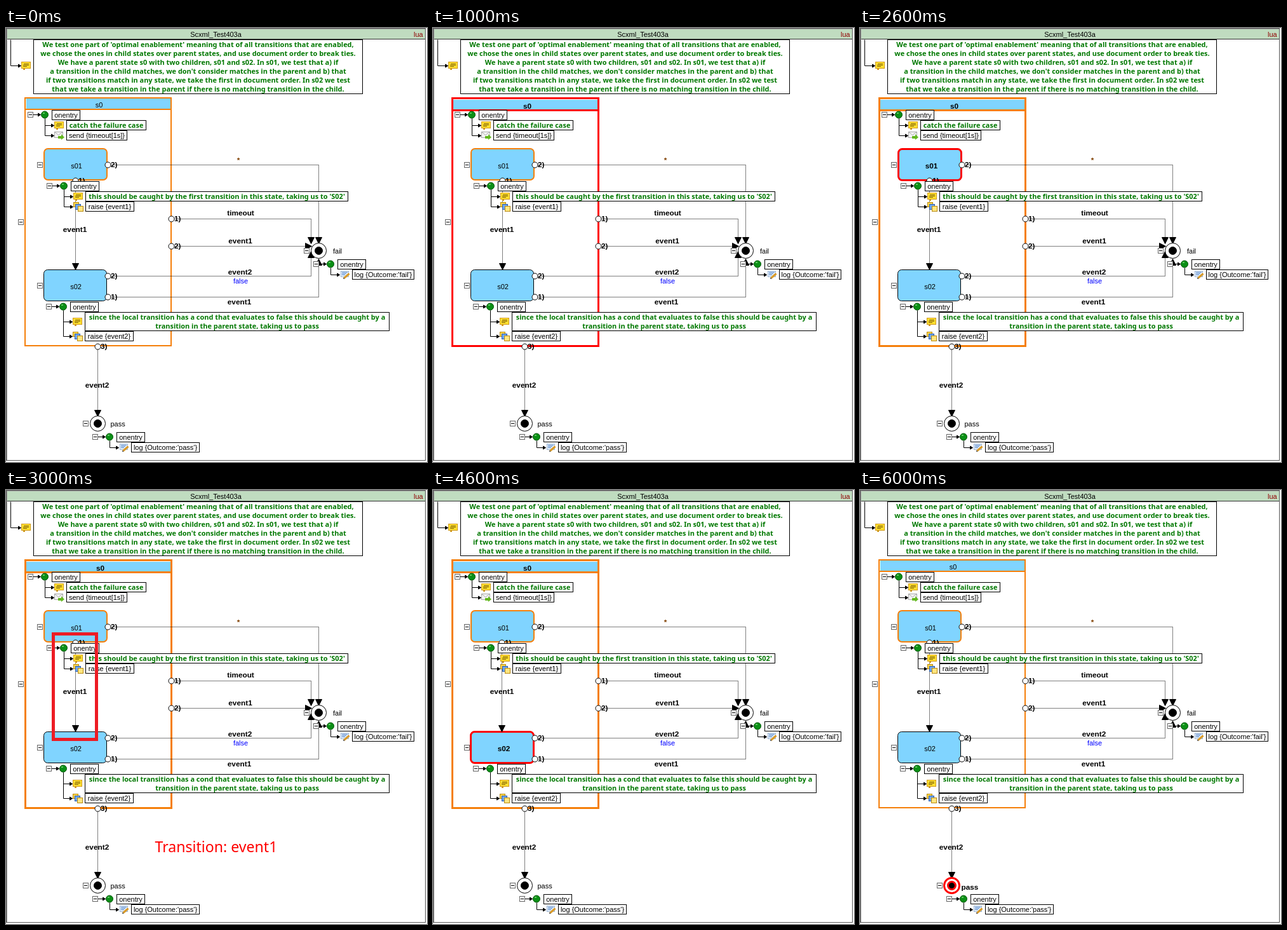
These frames come from a looping animation (663x683 px, 7 s). An HTML page with a canvas:

```html
<!DOCTYPE html>
<html>
<head>
<meta charset="utf-8">
<style>
html, body { margin: 0; width: 100%; height: 100%; overflow: hidden; background: #fff; }
canvas { display: block; }
</style>
</head>
<body>
<canvas id="stage" width="663" height="683"></canvas>
<script>
const c = document.getElementById('stage').getContext('2d');
const PLAIN = '11px "Liberation Sans", Arial, sans-serif';
const BOLD = 'bold 11.8px "Liberation Sans", Arial, sans-serif';
const NOTE = 'bold 10.95px "Noto Sans", "Open Sans", sans-serif';
const CAPTION = '23.1px "Noto Sans", "Open Sans", sans-serif';
const BLUE = '#80d4ff', ORANGE = '#f57f0a', RED = '#f00', GREEN = '#007800';
const LINE = 14;

function text(s, x, y, font = PLAIN, color = '#000', align = 'center') {
  c.font = font;
  c.fillStyle = color;
  c.textAlign = align;
  c.fillText(s, x, y);
}

function fill(color, x, y, w, h) {
  c.fillStyle = color;
  c.fillRect(x, y, w, h);
}

function box(x, y, w, h, back = '#fff', edge = '#000') {
  fill(edge, x, y, w, h);
  fill(back, x + 1, y + 1, w - 2, h - 2);
}

function frame(x, y, w, h, color, width) {
  c.strokeStyle = color;
  c.lineWidth = width;
  c.strokeRect(x, y, w, h);
}

// A bordered box sized to its lines of text; returns its height.
function textBox(x, y, width, lines, font = PLAIN, color = '#000') {
  const height = lines.length * LINE + 2;
  box(x, y, width, height);
  lines.forEach((s, i) => text(s, x + width / 2, y + 12 + i * LINE, font, color));
  return height;
}

function disc(x, y, r, back, edge = '#000', width = 1) {
  c.beginPath();
  c.arc(x, y, r, 0, 7);
  c.fillStyle = back;
  c.fill();
  c.strokeStyle = edge;
  c.lineWidth = width;
  c.stroke();
}

function line(points, color = '#000', width = 1, dash = []) {
  c.beginPath();
  for (const [x, y] of points) c.lineTo(x + .5, y + .5);
  c.setLineDash(dash);
  c.strokeStyle = color;
  c.lineWidth = width;
  c.stroke();
  c.setLineDash([]);
}

function head(x, y, angle, length, half) {
  c.save();
  c.translate(x + .5, y + .5);
  c.rotate(angle);
  c.beginPath();
  c.moveTo(0, 0);
  c.lineTo(-length, -half);
  c.lineTo(-length, half);
  c.closePath();
  c.fillStyle = c.strokeStyle = '#000';
  c.lineWidth = 1;
  c.lineJoin = 'round';
  c.fill();
  c.stroke();
  c.restore();
}

function arrow(points) {
  line(points);
  const [x, y] = points[points.length - 1];
  head(x, y, 0, 4, 2.5);
}

function transition(label, ...points) {
  const [x, y] = points[0], [ex, ey] = points[points.length - 1], [px, py] = points[points.length - 2];
  line(points, '#000', 1, [1, 1]);
  head(ex, ey, Math.atan2(ey - py, ex - px), 10, 5);
  disc(x + .5, y + .5, 4.5, '#fff');
  text(label, x + 5, y + 4, BOLD, '#000', 'left');
}

function minus(x, y) {
  box(x - 4, y - 4, 9, 9, '#fff', '#666');
  fill('#000', x - 2, y, 5, 1);
}

const icons = {
  note(x, y) {
    box(x, y - 6, 15, 11, '#ffe030', '#d09a20');
    fill('#d09a20', x + 3, y + 5, 3, 2);
    fill('#7a5c00', x + 4, y - 3, 8, 1);
    fill('#7a5c00', x + 3, y - 1, 9, 1);
    fill('#7a5c00', x + 3, y + 1, 6, 1);
  },
  send(x, y) {
    box(x, y - 6, 14, 10, '#f4f4f4', '#aaa');
    line([[x, y - 6], [x + 6, y - 1], [x + 13, y - 6]], '#aaa');
    c.beginPath();
    for (const [dx, dy] of [[6, 1], [11, 1], [11, -2], [16, 3], [11, 7], [11, 5], [6, 5]]) c.lineTo(x + dx, y + dy);
    c.fillStyle = '#62b81e';
    c.fill();
  },
  raise(x, y) {
    box(x, y - 7, 9, 8, '#ffd84a', '#b98a10');
    box(x + 3, y - 4, 9, 9, '#6fa8f0', '#2c5cae');
    box(x + 7, y - 1, 9, 9, '#ffe680', '#b98a10');
  },
  log(x, y) {
    box(x + 1, y - 6, 13, 10, '#eaf3ff', '#9ab4d4');
    for (let i = 0; i < 3; i++) fill('#4f83c8', x + 3, y - 4 + i * 2, 9 - i * 2, 1);
    line([[x + 6, y + 5], [x + 14, y - 2]], '#d99a28', 3);
    line([[x + 5, y + 6], [x + 6, y + 5]], '#333', 2);
  }
};

// Each child is [icon, box width, ...lines]; the boxes stack without gaps.
function onentry(x, y, ...children) {
  let top = y - 7 + textBox(x + 34, y - 7, 45, ['onentry']);
  for (const [icon, width, ...lines] of children) {
    const style = icon === 'note' ? [NOTE, GREEN] : [];
    const height = textBox(x + 57, top, width, lines, ...style);
    const row = top + height / 2;
    arrow([[x + 23, y + 6], [x + 23, row], [x + 37, row]]);
    icons[icon](x + 38, row);
    top += height;
  }
  arrow([[x + 4, y], [x + 16, y]]);
  minus(x, y);
  disc(x + 23, y + .5, 5.5, '#0b8f16', '#07560c');
  fill('#5cc45c', x + 20, y - 3, 3, 2);
}

function state(name, x, y, edge, width, active) {
  const stroke = active ? 3 : width, o = stroke % 2 / 2;
  c.beginPath();
  c.roundRect(x + o, y + o, 99, 49, 6);
  c.fillStyle = BLUE;
  c.fill();
  c.strokeStyle = active ? RED : edge;
  c.lineWidth = stroke;
  c.stroke();
  const shift = active ? 1.5 : 0;
  text(name, x + 51 + shift, y + 30.5 + shift / 2, active ? BOLD : PLAIN);
}

function final(name, x, y, labelX, active) {
  const edge = active ? RED : '#000', width = active ? 3 : 1;
  disc(x, y, 12, '#fff', edge, width);
  disc(x, y, 6, '#000', edge, width);
  if (active) text(name, x + 15, y + 6, BOLD, '#000', 'left');
  else text(name, labelX, y + 4, PLAIN, '#000', 'left');
}

function header() {
  fill('#fff', 0, 0, 663, 683);
  box(0, 0, 661, 681, '#fff', '#555');
  fill('#999', 1, 1, 659, 1);
  fill('#999', 1, 1, 1, 679);
  fill('#c0dcc0', 2, 2, 658, 15);
  fill('#333', 2, 17, 658, 1);
  text('Scxml_Test403a', 330.5, 14);
  text('lua', 642, 14, PLAIN, '#900000', 'left');
  arrow([[7, 18], [7, 59], [23, 59]]);
  icons.note(24, 59);
  textBox(43, 18, 519, [
    "We test one part of 'optimal enablement' meaning that of all transitions that are enabled,",
    'we chose the ones in child states over parent states, and use document order to break ties.',
    'We have a parent state s0 with two children, s01 and s02. In s01, we test that a) if',
    "a transition in the child matches, we don't consider matches in the parent and b) that",
    'if two transitions match in any state, we take the first in document order. In s02 we test',
    'that we take a transition in the parent if there is no matching transition in the child.'
  ], NOTE, GREEN);
}

function parent(step) {
  const thick = step >= 1 && step <= 4, edge = step === 1 ? RED : ORANGE;
  const o = thick ? .5 : 0, w = thick ? 3 : 2;
  fill(BLUE, 32, thick ? 113 : 111, 227, 16);
  frame(30 + o, 110 + o, 230, 390, edge, w);
  fill(edge, 31, thick ? 128 : 127, 229, w);
  text('s0', thick ? 148.5 : 146.5, thick ? 127 : 125, thick ? BOLD : PLAIN);
}

function draw(step) {
  header();
  parent(step);
  state('s01', 60, 190, ORANGE, 2, step === 2);
  state('s02', 59, 380, '#000', 1, step === 4);

  const x = step === 4 ? 108 : 109;
  transition('1)', [x, 240], [x, 380]);
  transition('2)', [160, 215], [492, 215], [492, 339]);
  transition('1)', [260, 300], [480, 300], [480, 339]);
  transition('2)', [260, 343], [481, 343]);
  transition('2)', [160, 390], [480, 390], [480, 351]);
  transition('1)', [160, 423], [492, 423], [492, 363]);
  transition('3)', [144, 501], [144, 611]);

  text('*', 366, 212, BOLD, '#804000');
  text('timeout', 369.5, 295, BOLD);
  text('event1', 369, 339, BOLD);
  text('event2', 368.5, 388, BOLD);
  text('false', 369.5, 402, PLAIN, '#00f');
  text('event1', 367.5, 435, BOLD);
  text('event1', 108.5, 321, BOLD);
  text('event2', 143.5, 566, BOLD);

  final('fail', 492.5, 350.5, 515, false);
  final('pass', 144.5, 622.5, 164.5, step === 6);
  for (const [mx, my] of [[53, 215], [53, 405], [23, 305], [473, 350], [125, 622]]) minus(mx, my);

  onentry(38, 136, ['note', 126, 'catch the failure case'], ['send', 96, 'send {timeout[1s]}']);
  onentry(68, 248,
    ['note', 414, "this should be caught by the first transition in this state, taking us to 'S02'"],
    ['raise', 77, 'raise {event1}']);
  onentry(67, 438,
    ['note', 480, 'since the local transition has a cond that evaluates to false this should be caught by a',
      'transition in the parent state, taking us to pass'],
    ['raise', 77, 'raise {event2}']);
  onentry(488, 371, ['log', 98, "log {Outcome:'fail'}"]);
  onentry(140, 643, ['log', 108, "log {Outcome:'pass'}"]);

  if (step === 3) frame(74.5, 226.5, 68, 166, '#ed1c24', 5);
  if (step === 5) frame(104.5, 492.5, 75, 121, '#ed1c24', 5);
  if (step === 3 || step === 5) {
    text('Transition: event' + (step === 3 ? 1 : 2), 234.5, 570, CAPTION, RED, 'left');
  }
}

function tick() {
  draw(Math.floor(performance.now() / 1000) % 7);
  requestAnimationFrame(tick);
}
tick();
</script>
</body>
</html>
```
